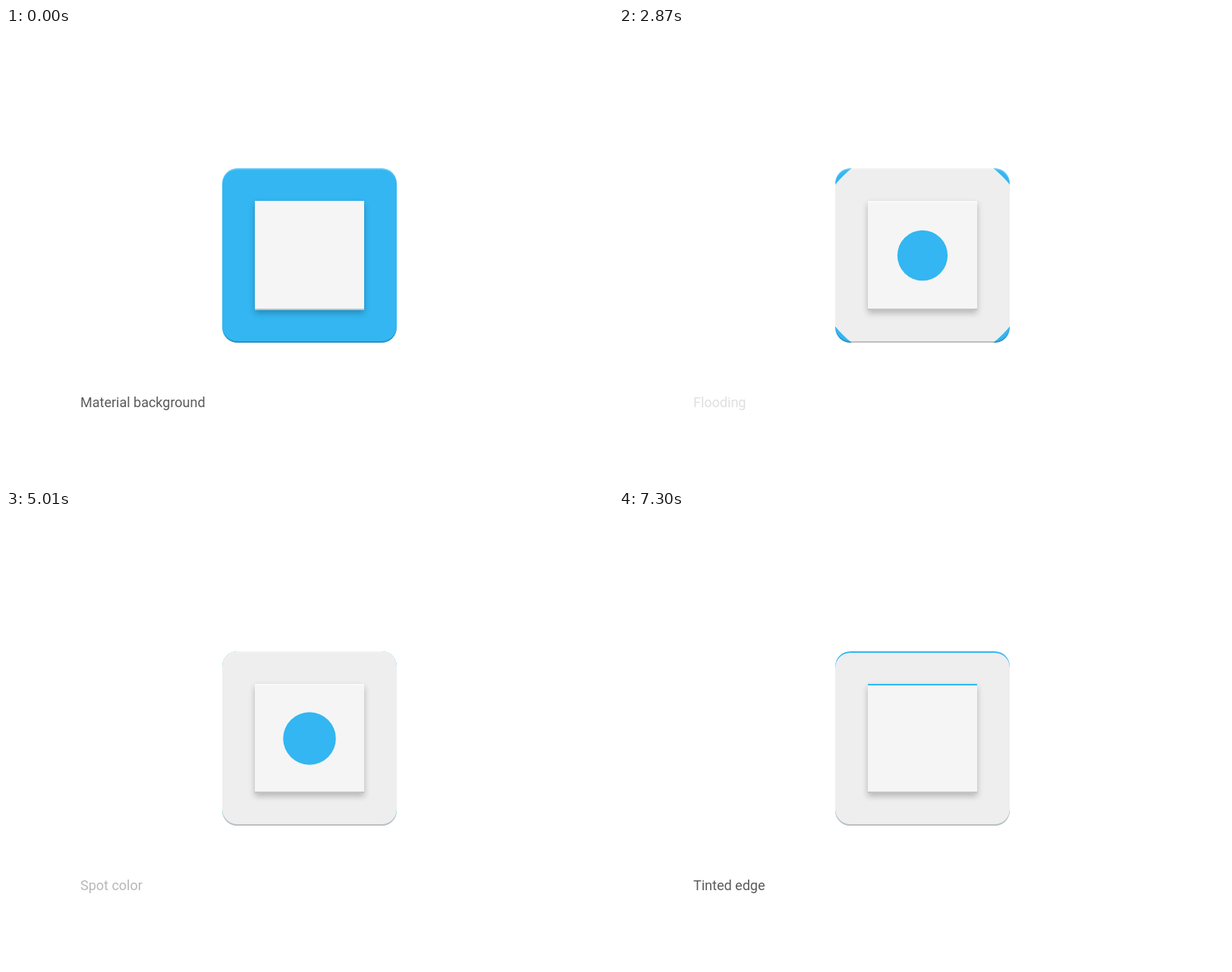
Recreate the animation shown at these times as an HTML page. Size 800 by 600 pixels, loop 8 s.

```html
<!DOCTYPE html>
<html lang="en">
<head>
<meta charset="utf-8">
<title>Material icon</title>
<style>
  :root { --blue: #33b6f2; --grey: #eee; --paper: #f5f5f5; }
  html, body { margin: 0; width: 100%; height: 100%; overflow: hidden; background: #fff; }
  .tile, .paper, .layer, .caption { position: absolute; }
  .tile {
    left: 285px; top: 185px; width: 230px; height: 230px;
    border-radius: 20px; overflow: hidden; background: var(--blue);
  }
  .paper {
    left: 328px; top: 228px; width: 144px; height: 144px;
    background: var(--paper); box-shadow: 0 4px 8px rgba(0, 0, 0, .24);
  }
  .layer { inset: 0; border-radius: inherit; }
  .flood { border-radius: 0; clip-path: circle(0px); }
  .blue { background: var(--blue); }
  .grey { background: var(--grey); }
  .white { background: var(--paper); }
  .edge { box-shadow: inset 0 2px rgba(255, 255, 255, var(--shine)), inset 0 -2px rgba(0, 0, 0, .2); }
  .tile .edge { --shine: .2; }
  .paper .edge { --shine: .4; }
  .tint { box-shadow: inset 0 2px var(--blue); opacity: 0; }
  .caption {
    left: 98px; top: 483px; font: 18px/21px Roboto, sans-serif;
    color: #5a5a5a; white-space: pre;
  }
</style>
</head>
<body>
<div class="tile">
  <div class="layer flood grey" id="tileFlood"></div>
  <div class="layer edge"></div>
  <div class="layer tint"></div>
</div>
<div class="paper">
  <div class="layer flood blue" id="paperFlood"></div>
  <div class="layer flood white" id="paperClear"></div>
  <div class="layer flood blue" id="spot"></div>
  <div class="layer edge"></div>
  <div class="layer tint"></div>
</div>
<div class="caption" id="caption"></div>
<script>
  const LOOP = 8000, STEP = 30;
  const transitions = [1000, 2570, 4380, 6400];
  const captions = ['Material background', 'Flooding', 'Material foreground', 'Spot color', 'Tinted edge'];
  const swaps = [970, 2675, 4547, 6670];
  const FADE = 240, FADE_IN_DELAY = 360;

  const $ = id => document.getElementById(id);
  const tints = document.querySelectorAll('.tint');

  const smooth = p => p * p * (3 - 2 * p);
  const easeIn = p => p * p * p;
  const easeOut = p => 1 - (1 - p) * (1 - p);
  const progress = (t, start, length) => Math.min(1, Math.max(0, (t - start) / length));
  const tween = (t, start, end, from, to, ease) =>
    from + (to - from) * ease(progress(t, start, end - start));

  // Movement advances in 30 ms steps counted from each transition's start.
  function quantize(t) {
    const start = transitions.filter(s => s <= t).pop() || 0;
    return start + Math.floor((t - start) / STEP) * STEP;
  }

  function setRadius(id, r) {
    $(id).style.clipPath = `circle(${Math.max(0, r).toFixed(2)}px at 50% 50%)`;
  }

  function spotRadius(t) {
    if (t < 5220) return tween(t, 4740, 5220, 0, 43, easeOut);
    if (t < 6400) return tween(t, 5220, 5400, 43, 42, smooth);
    return tween(t, 6400, 6850, 42, 0, easeIn);
  }

  function drawCaption(t) {
    let index = 0, opacity = 1;
    swaps.forEach((start, i) => {
      // The first swap is already under way at its nominal start.
      if (t < Math.max(start, transitions[i])) return;
      const entering = t >= start + FADE;
      index = entering ? i + 1 : i;
      opacity = entering
        ? progress(t, start + FADE_IN_DELAY, FADE)
        : 1 - progress(t, start, FADE);
    });
    const el = $('caption');
    if (el.textContent !== captions[index]) el.textContent = captions[index];
    el.style.opacity = opacity;
  }

  function draw(time) {
    const t = quantize(time);
    setRadius('tileFlood', tween(t, 2570, 2930, 0, 160, smooth));
    setRadius('paperFlood', t < 2570 ? 0 : tween(t, 2570, 3380, 2, 102.5, smooth));
    setRadius('paperClear', t < 4380 ? 0 : tween(t, 4380, 4860, 3, 104, smooth));
    setRadius('spot', spotRadius(t));
    const tint = tween(t, 6820, 7300, 0, 1, smooth);
    tints.forEach(el => { el.style.opacity = tint; });
    drawCaption(t);
  }

  const origin = performance.now();
  function tick() {
    draw((performance.now() - origin) % LOOP);
    requestAnimationFrame(tick);
  }
  tick();
</script>
</body>
</html>
```
